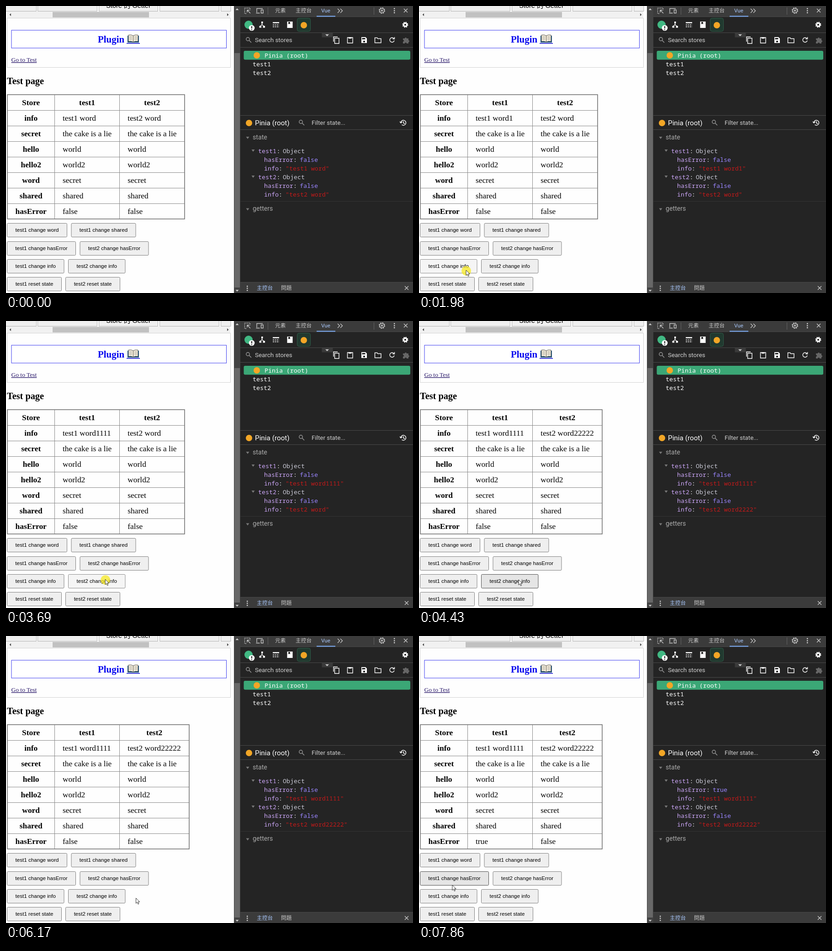
Recreate the animation shown at these times as an HTML page. Size 891 px wide and 628 px high, loop 8000 ms.

```html
<!DOCTYPE html>
<html lang="zh-Hant">
<head>
<meta charset="utf-8">
<title>Store plugin test page</title>
<style>
  html, body { margin: 0; width: 100%; height: 100%; overflow: hidden; background: #fefefe; }
  svg { display: block; }
  text { white-space: pre; }
  .serif { font: 17.4px "Liberation Serif", serif; }
  .bold { font-weight: bold; }
  .mid { text-anchor: middle; }
  .btn { font: 11.63px "Liberation Sans", sans-serif; text-anchor: middle; }
  .ui { font: 13.4px Roboto, sans-serif; fill: #d0d0d0; }
  .tab { font: 11.7px Roboto, "Noto Sans CJK TC", "Noto Sans CJK", sans-serif; fill: #c7c7c7; }
  .mono { font: 13.3px "Noto Sans Mono", monospace; fill: #fff; }
  .mono.key { fill: #cba6f7; }
  .mono.type { fill: #c8c8d4; }
  .mono.bool { fill: #9a86ff; }
  .mono.str { fill: #c41a1a; }
  .line { fill: none; stroke-width: 1.4; }
</style>
</head>
<body>
<svg width="891" height="628" viewBox="0 0 891 628">
  <!-- page header -->
  <g fill="#efefef" stroke="#b5b5b5">
    <path d="M-1-1H66.500V11.500H-1zM69.500-1H199.500V11.500H69.500zM203.500-1H332.500V11.500H203.500zM336.500-1H466.500V11.500H336.500zM470.500-1H492V11.500H470.500z"/>
  </g>
  <text x="268" y="4" class="mid" font-size="14.500" font-family="Liberation Sans, Noto Sans CJK TC, Noto Sans CJK, sans-serif">Store 的 Getter</text>
  <path fill="#f1f1f1" d="M2 12H491V26H2z"/>
  <path fill="#c1c1c1" d="M102 13H313V25H102z"/>
  <path fill="#505050" d="M11 16v6l-3.500-3zM484 16v6l3.500-3z"/>
  <path fill="none" stroke="#d2d2d2" d="M2 26.500H491.500V134.500H2.500V26.500"/>
  <rect x="12" y="53" width="470.500" height="39" fill="#fff" stroke="#3a3af0"/>
  <text x="201" y="80" class="serif bold" fill="#00e" style="font-size:20.900px">Plugin</text>
  <path fill="#00c" d="M264 81h29v1.500h-29z"/>
  <path fill="#23577f" d="M266 65h25v15h-25z"/>
  <path fill="#f3ecd9" stroke="#333" stroke-width=".8" d="M268 63.500q6-1.500 10.500 1.500 4.500-3 10.500-1.500v14q-6-1.500-10.500 1.500-4.500-3-10.500-1.500zM278.500 65v14"/>
  <path stroke="#888" stroke-width=".8" d="M270 67h6m-6 3h6m-6 3h6m5-6h6m-6 3h6m-6 3h6"/>
  <text x="11.500" y="122" class="serif" fill="#2b1a6b" text-decoration="underline" style="font-size:13.500px">Go to Test</text>
  <text x="2" y="171" class="serif bold" style="font-size:20.300px">Test page</text>
  <g id="page"></g>

  <!-- scrollbar -->
  <path fill="#424242" d="M499 0h14v628h-14z"/>
  <path fill="#686868" d="M500 103h12v513h-12z"/>
  <path fill="#c8c8c8" d="M502.500 9h7l-3.500-4zM502.500 621h7l-3.500 4z"/>

  <!-- devtools -->
  <path fill="#242424" d="M513 0h378v628H513z"/>
  <path fill="#3b3b3b" d="M513 0h378v23.500H513zM513 605h378v23H513z"/>
  <path fill="#4a4a4a" d="M513 23h378v1H513zM513 58h378v1H513zM513 90h378v1H513zM513 239h378v1H513zM513 270h378v1H513zM513 604h378v1H513z"/>
  <path fill="#333" d="M513 427h378v1H513z"/>
  <path fill="#626262" d="M573 3h1v16h-1zM805 3h1v16h-1z"/>
  <path fill="#7cacf8" d="M680 21.500h41v2h-41z"/>
  <g class="line" stroke="#c7c7c7">
    <path stroke-dasharray="2 1.500" d="M526 16.500h-3.500v-12h12v5"/>
    <path d="M528 9l7 7m-7-2V9h5M549 14V5.500h13M547.500 15.500h8M558.500 8.500h4.500v7h-4.500z"/>
    <path d="M726 6l4.500 4.500-4.500 4.500m6-9l4.500 4.500-4.500 4.500M871 6l8 8m0-8l-8 8M873 613l8 8m0-8l-8 8"/>
    <circle cx="823" cy="10" r="5"/><circle cx="823" cy="10" r="6.300" stroke-dasharray="2.500 2.450"/><circle cx="823" cy="10" r="1.500"/>
  </g>
  <path id="dots" fill="#d0d0d0" d="M849 4.500h2.400v2.400H849zm0 4.500h2.400v2.400H849zm0 4.500h2.400v2.400H849zM527 612h2.400v2.400H527zm0 4.500h2.400v2.400H527zm0 4.500h2.400v2.400H527z"/>
  <circle cx="531" cy="41" r="9" fill="#41b883"/>
  <circle cx="538" cy="48" r="6.300" fill="#fff"/>
  <path fill="#222" d="M537 44h2v5h-2zM537 50.500h2v2h-2z"/>
  <rect x="637.500" y="26.500" width="29" height="29" rx="4" fill="#21392f" stroke="#2f5b48"/>
  <g fill="#f3a626">
    <circle cx="652" cy="42" r="7"/><circle cx="532" cy="256" r="7"/>
  </g>
  <g class="line" stroke="#fff">
    <path d="M560.500 36v4.500m-4 4l4-4 4 4"/>
    <path stroke-width="2.500" d="M584 36.500h14"/>
    <path stroke-dasharray="3 1.500" d="M584 41.500h14m-14 4h14"/>
    <circle cx="874" cy="41" r="3.600" stroke-width="3"/><circle cx="874" cy="41" r="5.500" stroke-width="2" stroke-dasharray="2.300 2.020"/>
    <path d="M717 78V67.500h9M719.500 70.500h9.500V82h-9.500zM747.500 69h11.500v12h-11.500zM807.500 69.500h5l1.500 2h7v9h-13.500z"/>
    <path stroke-width="2.600" d="M750 70h6.500"/>
    <path d="M849 71a5 5 0 1 0 1 4.500M850.500 68v4h-4"/>
    <path d="M864.500 255.500a5.500 5.500 0 1 1 2 4.200M862 253l2.500 3 3-2.500M870 252v4l3 1.500"/>
  </g>
  <path fill="#fff" d="M559 34h3.500v4H559zM554.500 43.500h4.500v4h-4.500zM562.500 43.500h4.500v4h-4.500zM615.500 34h12v14h-12zM778 68h9l3 3v10h-12z"/>
  <path fill="#242424" d="M618 35h4v5l-2-1.500-2 1.500zM779.500 70h7v3h-7zM782 76h4v3.500h-4z"/>
  <path fill="#666" d="M869 71h4a2 2 0 1 1 4 0h4v4a2 2 0 1 1 0 4v3h-4a2 2 0 1 0-4 0h-4v-4a2 2 0 1 0 0-4z"/>
  <path fill="#3a3a3a" d="M691.500 59h24v9.500h-24z"/>
  <path fill="#ccc" d="M699 62h8l-4 4z"/>
  <g class="line" stroke="#999">
    <circle cx="529.500" cy="72.500" r="3.700"/><path d="M532 75l5 5"/>
    <circle cx="645.500" cy="253.500" r="3.700"/><path d="M648 256l5 5"/>
  </g>
  <rect x="520.500" y="98" width="364.500" height="19.500" rx="3" fill="#3ba776"/>
  <circle cx="549" cy="108" r="7" fill="#f3a626"/>
  <path fill="#777" d="M525.500 286h7l-3.500 5zM525.500 442.500h7l-3.500 5zM537.500 314h7l-3.500 5zM537.500 371h7l-3.500 5z"/>
  <g id="tools"></g>

  <g id="rowIcons" fill="#fff">
    <path d="M687 396v2.500h2.500l6-6-2.500-2.500zM694 389l1.500-1.500 2.500 2.500-1.500 1.500zM748.500 390h7.500v7.500a1 1 0 0 1-1 1h-5.500a1 1 0 0 1-1-1zM747.500 387.500h3l.7-1h2l.7 1h3v1.500h-9.400zM775.500 388h2.400v2.400h-2.400zm0 4h2.400v2.400h-2.400zm0 4h2.400v2.400h-2.400z"/>
    <path class="line" stroke="#fff" d="M712.500 388h10v9.500h-10z"/>
  </g>
  <g id="pointer">
    <circle id="press" cx=".500" cy="1.500" r="10.500" fill="#f8ea1c" fill-opacity=".72"/>
    <path id="arrow" fill="#fff" stroke="#222" stroke-width=".9" d="M0 0v11.500l2.600-2.500 2 4.400 1.900-.9-2-4.200h3.800z"/>
    <path id="hand" fill="#fff" stroke="#111" stroke-width=".9" d="M-1.500 1q1.500-2 3 0v4.500q2-1 2.500.5 2-.8 2.300.7 2-.3 2 1.300v3l-1.500 4.500h-6.500l-5-6q0-2 3.200.5z"/>
  </g>
</svg>
<script>
const LOOP = 8000, STEP = 70, ECHO = 70;
const $ = id => document.getElementById(id);
const text = (x, y, s, cls, id) => `<text x="${x}" y="${y}" class="${cls}"${id ? ` id="${id}"` : ''}>${s}</text>`;

// Table and buttons
const rows = [
  ['Store'], ['info', 'test1 word', 'test2 word'], ['secret', 'the cake is a lie', 'the cake is a lie'],
  ['hello', 'world', 'world'], ['hello2', 'world2', 'world2'], ['word', 'secret', 'secret'],
  ['shared', 'shared', 'shared'], ['hasError', 'false', 'false']
];
let page = '<path id="grid" fill="none" stroke="#8a8a8a"/><rect id="frame" x="3" y="194" height="272" fill="none" stroke="#747474" stroke-width="1.6"/>';
rows.forEach(([name, a, b], i) => {
  const y = 217 + 34 * i;
  page += text(54.7, y, name, 'serif bold mid');
  if (a) page += text(124, y, a, 'serif', 'a-' + name) + text(266.3, y, b, 'serif', 'b-' + name);
});
page += text(177.5, 217, 'test1', 'serif bold mid') + text(320, 217, 'test2', 'serif bold mid', 'head2');

const buttons = [
  [2, 475, 132, 'test1 change word'], [142.5, 475, 142, 'test1 change shared'],
  [2, 515, 151, 'test1 change hasError'], [161.5, 515, 151, 'test2 change hasError'],
  [2, 554, 125.5, 'test1 change info'], [136, 554, 125.5, 'test2 change info'],
  [2, 593, 120, 'test1 reset state'], [130, 593, 120, 'test2 reset state']
];
buttons.forEach(([x, y, w, label], i) => {
  page += `<rect id="btn${i}" x="${x + .5}" y="${y + .5}" width="${w - 1}" height="30" rx="2"/>` + text(x + w / 2, y + 19, label, 'btn');
});
$('page').innerHTML = page;

// Devtools text
let tools = text(589, 14, '元素', 'tab') + text(634, 14, '主控台', 'tab') + text(602, 621, '問題', 'tab')
  + `<g style="--c:#a8c7fa">${text(690, 14, 'Vue', 'tab accent')}${text(549, 621, '主控台', 'tab accent')}</g>`
  + text(545, 79, 'Search stores', 'ui') + text(669, 260, 'Filter state...', 'ui')
  + text(566, 113, 'Pinia (root)', 'mono') + text(540, 132, 'test1', 'mono') + text(540, 151, 'test2', 'mono')
  + text(545, 261, 'Pinia (root)', 'ui title') + text(540, 292, 'state', 'ui section') + text(540, 448, 'getters', 'ui section');
['test1', 'test2'].forEach((store, i) => {
  const y = 322 + 57 * i;
  tools += text(552, y, store, 'mono key') + text(592.5, y, ':', 'mono') + text(606, y, 'Object', 'mono type')
    + text(565, y + 19, 'hasError', 'mono key') + text(629, y + 19, ':', 'mono') + text(643, y + 19, 'false', 'mono bool', 'err' + i)
    + text(565, y + 38, 'info', 'mono key') + text(597, y + 38, ':', 'mono') + text(612, y + 38, '', 'mono str', 'info' + i);
});
$('tools').innerHTML = tools;
document.querySelectorAll('.accent').forEach(e => e.style.fill = 'var(--c)');
document.querySelectorAll('.section').forEach(e => e.style.cssText = 'font-size:14.2px;fill:#aaa');
Object.assign(document.querySelector('.title').style, { fontSize: '15.3px', fill: '#fff' });

// Pointer path [ms, x, y] and clicks [press, release]
const path = [
  [190, 822, 284], [960, 40, 612], [1240, 105, 574], [1510, 103, 578], [2390, 103, 578], [2530, 118, 511],
  [2740, 241, 215], [2880, 241, 216], [3420, 217, 565], [4430, 218, 566], [4780, 380, 197], [5270, 667, 398],
  [5620, 811, 408], [5760, 811, 408], [6290, 165, 611], [6580, 86, 543], [7600, 86, 543], [7860, 72, 545], [8000, 72, 545]
];
const ones = [[1780, 1850], [1980, 2110], [2180, 2250], [2320, 2390]];
const twos = [[3690, 3760], [3830, 3900], [3990, 4070], [4150, 4230], [4330, 4430]];
const flips = [[6850, 7050], [7190, 7330], [7470, 7540]];
const count = (clicks, t) => clicks.filter(c => t >= c[1]).length;
const isDown = t => [...ones, ...twos, ...flips].some(([a, b]) => t >= a && t < b);

function pointerAt(t) {
  const s = 190 + Math.floor((t - 190) / STEP + 0.15) * STEP;
  const i = Math.max(1, path.findIndex(p => p[0] >= s));
  const [t0, x0, y0] = path[i - 1], [t1, x1, y1] = path[i];
  const k = (1 - Math.cos(Math.PI * Math.min(1, Math.max(0, (s - t0) / (t1 - t0))))) / 2;
  return [x0 + (x1 - x0) * k, y0 + (y1 - y0) * k];
}

const set = (id, value) => { if ($(id).textContent !== value) $(id).textContent = value; };
const show = (id, on) => $(id).style.display = on ? '' : 'none';

function draw(t) {
  const values = at => ['test1 word' + '1'.repeat(count(ones, at)), 'test2 word' + '2'.repeat(count(twos, at)), String(count(flips, at) % 2 === 1)];
  const [info1, info2, error] = values(t), echo = values(t - ECHO);
  set('a-info', info1); set('b-info', info2); set('a-hasError', error);
  set('info0', `"${echo[0]}"`); set('info1', `"${echo[1]}"`); set('err0', echo[2]);

  const right = 391 + ({ 4: 1, 5: 10 }[count(twos, t)] || 0);
  $('frame').setAttribute('width', right - 3);
  $('head2').setAttribute('x', (248.5 + right) / 2);
  let grid = 'M106.5 194v272M248.5 194v272';
  for (let y = 228.5; y < 460; y += 34) grid += `M3 ${y}H${right}`;
  $('grid').setAttribute('d', grid);

  const visible = t >= 190, down = isDown(t), [x, y] = pointerAt(t);
  buttons.forEach(([bx, by, w], i) => {
    const hover = visible && x >= bx && x < bx + w && y >= by && y < by + 31;
    const [fill, stroke] = !hover ? ['#efefef', '#808080'] : down ? ['#f5f5f5', '#8d8d8d'] : ['#e5e5e5', '#4f4f4f'];
    $('btn' + i).setAttribute('fill', fill);
    $('btn' + i).setAttribute('stroke', stroke);
  });

  const inTools = visible && x > 513;
  const row = [336, 393].find(r => Math.abs(y - r) < 9.5);
  show('rowIcons', inTools && row);
  if (row) $('rowIcons').setAttribute('transform', `translate(0 ${row - 393})`);
  const hand = inTools && y > 307 && y < 422;
  show('pointer', visible);
  show('press', down);
  show('arrow', !hand);
  show('hand', hand);
  $('pointer').setAttribute('transform', `translate(${x.toFixed(1)} ${y.toFixed(1)})`);
}

function frame() {
  draw(performance.now() % LOOP);
  requestAnimationFrame(frame);
}
frame();
</script>
</body>
</html>
```
